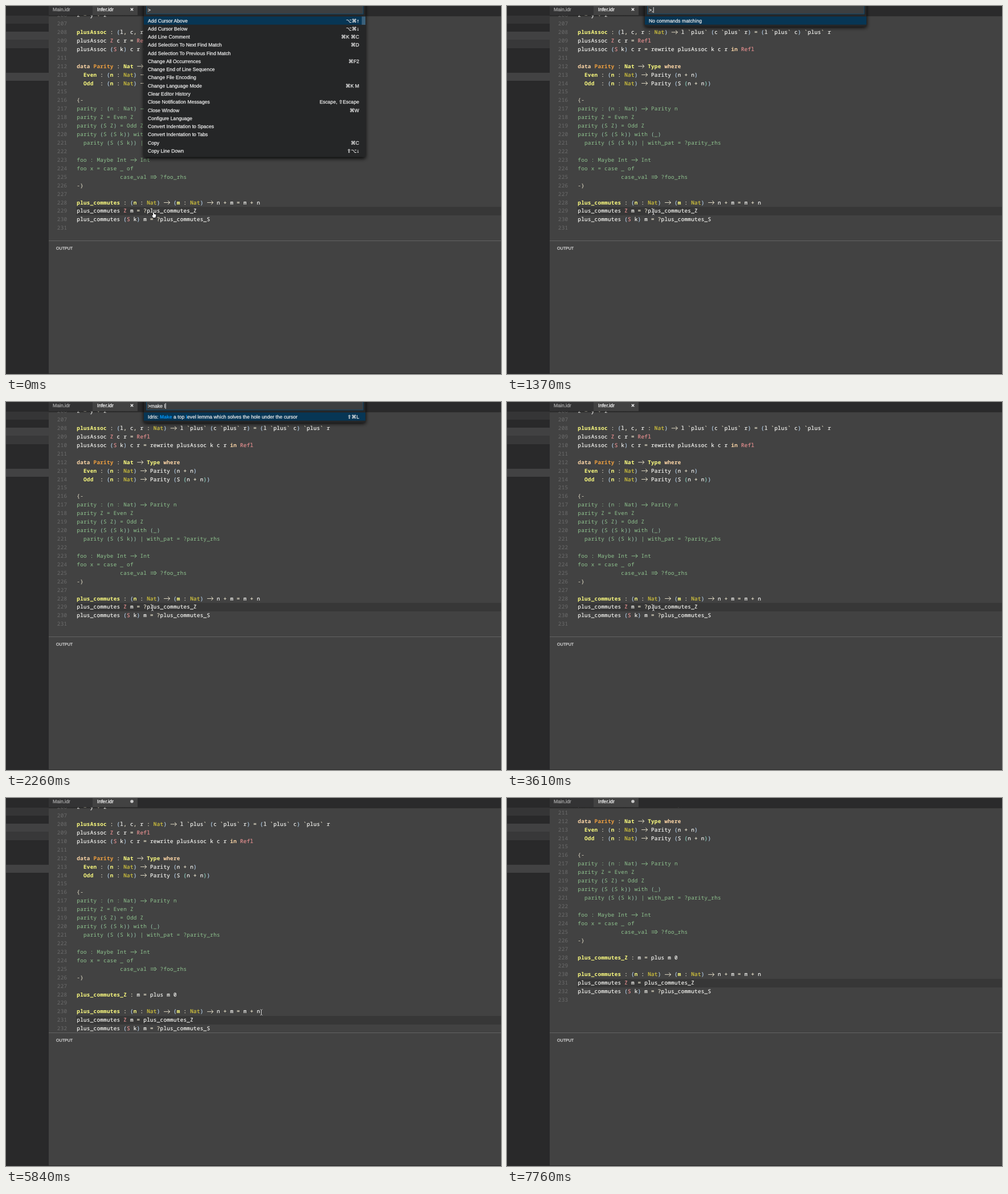
Write an HTML page with a canvas that moves like this. It is 869 px wide and 645 px high and loops after 8.05 s.

```html
<!DOCTYPE html>
<html lang="en">
<head>
<meta charset="utf-8">
<title>Editor: make lemma</title>
<style>
html, body { margin: 0; width: 100%; height: 100%; overflow: hidden; background: #424242; }
canvas { display: block; }
</style>
</head>
<body>
<canvas id="stage" width="869" height="645"></canvas>
<script>
const ctx = document.getElementById('stage').getContext('2d');
const LOOP = 8050, PITCH = 5.85, LINE = 14.93, ROW = 14.28;
const UI = '"Liberation Sans", "DejaVu Sans", sans-serif';
const MONO = '"Noto Sans Mono", "DejaVu Sans Mono", monospace';
const C = {
  bg: '#424242', side: '#29292a', white: '#f4f4f0', cream: '#ece6cf', green: '#8fc48f',
  yellow: '#ffff80', gold: '#d8c93c', pink: '#e89191', peach: '#ffd7a7',
  orange: '#f0a040', paren: '#b4cfe8', number: '#6c6c6c', match: '#0097fb'
};

const head = `z = y + z

plusAssoc : (l, c, r : Nat) -> l \`plus\` (c \`plus\` r) = (l \`plus\` c) \`plus\` r
plusAssoc Z c r = Refl
plusAssoc (S k) c r = rewrite plusAssoc k c r in Refl

data Parity : Nat -> Type where
  Even : (n : Nat) -> Parity (n + n)
  Odd  : (n : Nat) -> Parity (S (n + n))

{-
parity : (n : Nat) -> Parity n
parity Z = Even Z
parity (S Z) = Odd Z
parity (S (S k)) with (_)
  parity (S (S k)) | with_pat = ?parity_rhs

foo : Maybe Int -> Int
foo x = case _ of
             case_val => ?foo_rhs
-}

`;
const tail = hole => `plus_commutes : (n : Nat) -> (m : Nat) -> n + m = m + n
plus_commutes Z m = ${hole}plus_commutes_Z
plus_commutes (S k) m = ?plus_commutes_S
`;
const before = (head + tail('?')).split('\n');
const after = (head + 'plus_commutes_Z : m = plus m 0\n\n' + tail('')).split('\n');

const allCommands = `Add Cursor Above|⌥⌘↑
Add Cursor Below|⌥⌘↓
Add Line Comment|⌘K ⌘C
Add Selection To Next Find Match|⌘D
Add Selection To Previous Find Match
Change All Occurrences|⌘F2
Change End of Line Sequence
Change File Encoding
Change Language Mode|⌘K M
Clear Editor History
Close Notification Messages|Escape, ⇧Escape
Close Window|⌘W
Configure Language
Convert Indentation to Spaces
Convert Indentation to Tabs
Copy|⌘C
Copy Line Down|⇧⌥↓`.split('\n');
const matching = `Emmet: Evaluate Math Expression
Emmet: Go to Matching Pair
Emmet: Update Image Size
Idris: Add an initial pattern match clause|⇧⌘A
Idris: Make a case pattern match template for holes|⇧⌘M
Idris: Make a top level lemma which solves the hole under the cursor|⇧⌘L
Idris: Make a with rule pattern match template for the clause of function|⇧⌘W
Markdown: Open Preview|⇧⌘V
Markdown: Open Preview to the Side|⌘K V
Markdown: Show Source
Move Last Selection To Next Find Match|⌘K ⌘D
Move Last Selection To Previous Find Match
Select All Occurences of Find Match
Shell Command: Install 'code' command in PATH
Shell Command: Uninstall 'code' command from PATH
Show All Commands|⇧⌘P, F1
View: Maximize Editor Group and Hide Sidebar`.split('\n');

const typing = [
  [0, ''], [140, ','], [290, ',ma'], [470, ',make'], [920, ',mak'], [1070, ',ma'], [1220, ',m'],
  [1370, ','], [1520, ''], [1660, 'm'], [1810, 'ma'], [1960, 'mak'], [2110, 'make'],
  [2260, 'make l'], [2410, 'make le'], [2710, 'make lem'], [2860, 'make lemm'], [3310, 'make lemma']
];
const CLOSE = 3610, INSERT = 5100;
const caretOn = [[3760, 4050], [4500, 5690], [6130, 6560], [7010, 7460]];
const mousePath = [[5400, 257, 361], [6130, 584, 386], [6710, 621, 391], [7310, 750, 568], [7610, 820, 634]];

function rect(x, y, w, h, color) {
  ctx.fillStyle = color;
  ctx.fillRect(x, y, w, h);
}

function write(str, x, y, color, font, weight = 0) {
  ctx.font = font;
  ctx.fillStyle = ctx.strokeStyle = color;
  ctx.fillText(str, x, y + 3);
  if (weight) {
    ctx.lineWidth = weight;
    ctx.strokeText(str, x, y + 3);
  }
}

function label(str, x, y, color = '#ececec', bold = false, size = 8.65) {
  write(str, x, y, color, `${bold ? 'bold ' : ''}${size}px ${UI}`, bold ? 0 : 0.25);
  return x + ctx.measureText(str).width;
}

function mono(str, x, y, color, bold = false, weight = 0) {
  ctx.letterSpacing = '0.27px';
  write(str, x, y, color, `${bold ? 700 : 500} 9.3px ${MONO}`, weight);
  ctx.letterSpacing = '0px';
}

function stroke(points, color, width) {
  ctx.beginPath();
  points.forEach(([x, y], i) => i ? ctx.lineTo(x, y) : ctx.moveTo(x, y));
  ctx.strokeStyle = color;
  ctx.lineWidth = width;
  ctx.stroke();
}

function arrow(x, y, color, double) {
  const end = x + 11.3;
  for (const dy of double ? [-1.5, 1.5] : [0]) {
    stroke([[x + 0.7, y + dy], [end - Math.abs(dy), y + dy]], color, 0.9);
  }
  stroke([[end - 3.4, y - 3.2], [end, y], [end - 3.4, y + 3.2]], color, 1);
}

function tokenStyle(tok, line, at, depth) {
  const prior = line.slice(0, at), rest = line.slice(at + tok.length);
  if (/^(data|where|in)$/.test(tok)) return [C.peach, true];
  if (tok === 'Parity' && prior === 'data ') return [C.orange, true];
  if (/^\w/.test(tok) && /^\s*$|\($/.test(prior) && /^\s+:/.test(rest)) return [C.yellow, true];
  if (tok === 'Nat') return rest[0] === ')' ? [C.gold, false] : [C.yellow, true];
  if (tok === 'Type') return [C.yellow, true];
  if (/^(Z|S|Refl)$/.test(tok) && !line.includes('->')) return [C.pink, false];
  if (/[()]/.test(tok)) return [depth > 1 ? '#8fd3c4' : C.paren, false];
  return [/\w/.test(tok) ? C.white : C.cream, false];
}

function codeLine(line, y, comment) {
  let depth = 0;
  for (const { 0: tok, index } of line.matchAll(/->|=>|\w+|[^\s\w]/g)) {
    if (tok === '(') depth++;
    let [color, bold] = comment ? [C.green, false] : tokenStyle(tok, line, index, depth);
    if (comment && /[()]/.test(tok)) color = '#9bcdb4';
    if (tok === ')') depth--;
    const x = 124.3 + index * PITCH;
    if (tok === '->' || tok === '=>') arrow(x, y, color, tok === '=>');
    else mono(tok, x, y, color, bold, comment || bold ? 0 : 0.2);
  }
}

function editor(t) {
  const lines = t < INSERT ? before : after;
  const scroll = t < 6420 ? 0 : t < 6860 ? 32.4 : 65;
  const lineY = n => 31 + (n - 207) * LINE - scroll;
  const current = lineY(t < INSERT ? 229 : 231);

  ctx.save();
  ctx.beginPath();
  ctx.rect(75, 16, 794, 395);
  ctx.clip();
  rect(123, Math.round(current - 7.4), 746, 15, '#373737');
  lines.forEach((line, i) => {
    const n = 206 + i, y = lineY(n);
    if (y < 6) return;
    mono(String(n), 89.8, y, C.number);
    const fence = n === 216 || n === 226;
    if (fence) mono(line, 124.3, y, C.cream);
    else codeLine(line, y, n > 216 && n < 226);
  });
  if (caretOn.some(([a, b]) => t >= a && t < b)) rect(305.5, current - 7, 1.2, 14.5, '#fff');
  ctx.restore();

  const shade = ctx.createLinearGradient(0, 16, 0, 19);
  shade.addColorStop(0, 'rgba(0,0,0,.5)');
  shade.addColorStop(1, 'rgba(0,0,0,0)');
  rect(75, 16, 794, 3, shade);
}

function chrome(t) {
  rect(0, 0, 75, 645, C.side);
  rect(0, 17, 75, 14, '#353536');
  rect(0, 45, 75, 14, '#414142');
  rect(0, 59, 75, 15, '#383839');
  rect(0, 117, 75, 14, '#424243');

  rect(75, 0, 794, 16, '#2a2a2b');
  rect(75, 0, 77, 16, '#333334');
  rect(152, 0, 79, 16, C.bg);
  label('Main.idr', 82, 6, '#a9a9a9');
  label('Infer.idr', 160, 6, '#fff');
  if (t < INSERT) {
    stroke([[218.8, 3.8], [223.2, 8.2]], '#f0f0f0', 1.4);
    stroke([[223.2, 3.8], [218.8, 8.2]], '#f0f0f0', 1.4);
  } else {
    ctx.beginPath();
    ctx.arc(221, 6, 2.8, 0, 7);
    ctx.fillStyle = '#c8c8c8';
    ctx.fill();
  }

  rect(75, 411, 794, 1, '#626262');
  label('OUTPUT', 88, 423.5, '#dcdcdc', false, 7.1);
  if (t >= 4500 && t < INSERT) mono('loading...', 88, 442.5, C.white, false, 0.2);
  rect(75, 644, 794, 1, '#2a2a2b');
}

// Ranges of the query words in order, or null. Several words must each begin a word of the text.
function findWords(text, query) {
  const words = query.split(' ').filter(Boolean);
  const edge = words.length > 1 ? '\\b' : '';
  const ranges = [];
  let from = 0;
  for (const word of words) {
    const at = text.slice(from).search(new RegExp(edge + word, 'i'));
    if (at < 0) return null;
    ranges.push([from + at, from + at + word.length]);
    from += at + word.length;
  }
  return ranges;
}

function commandRow(item, y, query) {
  const [text, keys] = item.split('|');
  let x = 249, from = 0;
  for (const [a, b] of findWords(text, query)) {
    x = label(text.slice(from, a), x, y);
    x = label(text.slice(a, b), x, y, C.match, true);
    from = b;
  }
  label(text.slice(from), x, y);
  if (keys) {
    ctx.textAlign = 'right';
    label(keys, 620, y);
    ctx.textAlign = 'left';
  }
}

function palette(t) {
  const query = typing.findLast(([at]) => t >= at)[1];
  const items = query ? matching.filter(s => findWords(s.split('|')[0], query)) : allCommands;
  const focus = Math.max(0, query ? items.findIndex(s => s.toLowerCase().startsWith(query)) : 0);
  const rows = Math.max(1, items.length);

  ctx.save();
  ctx.shadowColor = '#000';
  ctx.shadowBlur = 7;
  ctx.shadowOffsetY = 2;
  rect(242, -10, 389, 10 + 18.4 + rows * ROW + 3.6, '#252627');
  ctx.restore();

  rect(246, -1, 381.5, 15.5, '#0e4a70');
  rect(247, -1, 379.5, 14.5, '#3c3f41');
  const end = label('>' + query, 249, 7, '#e4e4e4');
  if (t >= 140) rect(end + 0.3, 2, 0.9, 10, '#fff');

  rect(242, 18.4 + focus * ROW, 389, ROW, '#073655');
  if (!items.length) label('No commands matching', 249, 25.5);
  items.forEach((item, i) => commandRow(item, 25.5 + i * ROW, query));
  if (!query) rect(624.5, 18.4, 6.5, 14.6, 'rgba(121,150,170,.45)');
  else if (rows > 10) rect(624.5, 55, 6.5, 206, 'rgba(121,121,121,.18)');
}

function hand(x, y) {
  ctx.beginPath();
  ctx.moveTo(x - 2.2, y - 4.6);
  ctx.lineTo(x - 0.6, y - 4.6);
  ctx.lineTo(x, y - 1.2);
  ctx.lineTo(x + 3.4, y - 0.4);
  ctx.lineTo(x + 3, y + 3);
  ctx.lineTo(x + 2, y + 5);
  ctx.lineTo(x - 1.6, y + 5);
  ctx.lineTo(x - 4, y + 1);
  ctx.lineTo(x - 1.8, y + 1);
  ctx.closePath();
  ctx.strokeStyle = '#111';
  ctx.lineWidth = 1.4;
  ctx.stroke();
  ctx.fillStyle = '#fff';
  ctx.fill();
}

function beam(x, y) {
  for (const [color, width] of [['rgba(20,20,20,.6)', 2], ['#d8d8d8', 0.9]]) {
    stroke([[x - 2.2, y - 5.2], [x, y - 4.2], [x, y + 4.2], [x - 2.2, y + 5.2]], color, width);
    stroke([[x + 2.2, y - 5.2], [x, y - 4.2], [x, y + 4.2], [x + 2.2, y + 5.2]], color, width);
  }
}

function mouse(t) {
  if (t < 140) return hand(260, 366);
  if (t >= 7755) return;
  // The pointer is seen in steps of about 149 ms.
  const time = 920 + 148.7 * Math.floor((t - 915) / 148.7);
  const next = mousePath.findIndex(p => p[0] > time);
  if (next === 0) return beam(mousePath[0][1], mousePath[0][2]);
  if (next < 0) return beam(...mousePath.at(-1).slice(1));
  const [a, b] = [mousePath[next - 1], mousePath[next]];
  const k = (time - a[0]) / (b[0] - a[0]);
  beam(a[1] + (b[1] - a[1]) * k, a[2] + (b[2] - a[2]) * k);
}

function draw(t) {
  rect(0, 0, 869, 645, C.bg);
  chrome(t);
  editor(t);
  if (t < CLOSE) palette(t);
  mouse(t);
}

ctx.textRendering = 'geometricPrecision';
ctx.lineJoin = 'round';
const start = performance.now();
function tick() {
  draw((performance.now() - start) % LOOP);
  requestAnimationFrame(tick);
}
tick();
</script>
</body>
</html>
```
